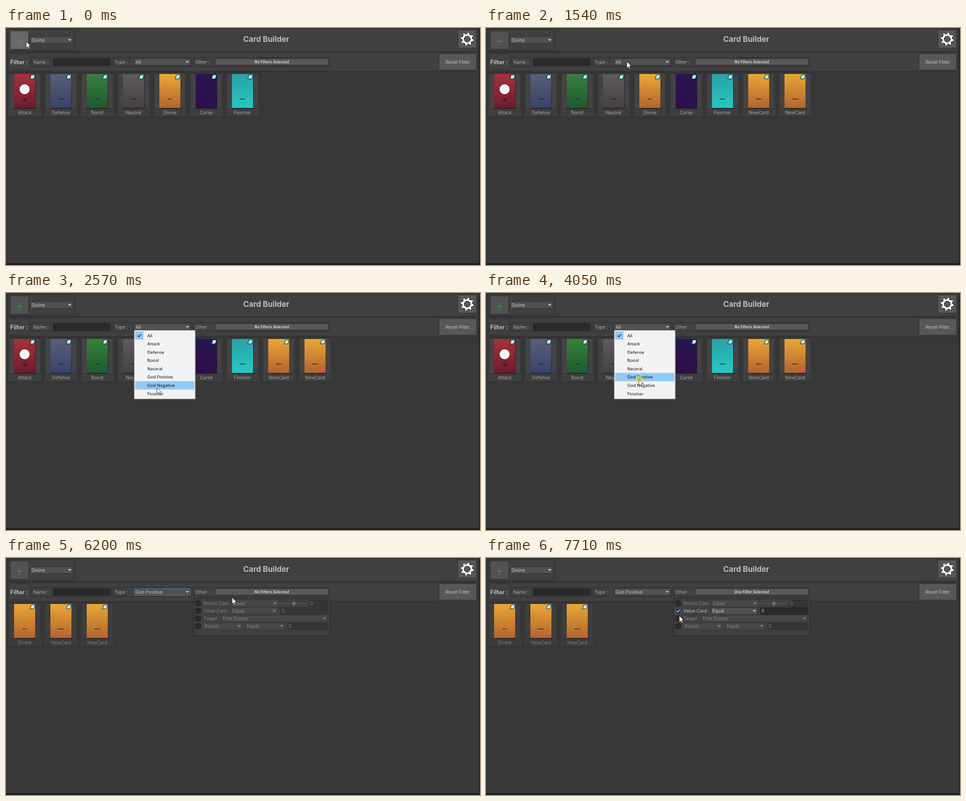
These frames come from a looping animation (1057x530 px, 8 s). An HTML page:

```html
<!DOCTYPE html>
<html lang="en">
<head>
<meta charset="utf-8">
<title>Card Builder</title>
<style>
  html, body { margin: 0; width: 100%; height: 100%; overflow: hidden; background: #383838; }
  svg { display: block; width: 1057px; height: 530px; }
  text { font: 10.2px Inter, sans-serif; fill: #c4c4c4; white-space: pre; }
  text.label { fill: #a9a9a9; }
  text.title { font-size: 17px; font-weight: 700; fill: #bdbdbd; }
  text.head { font-size: 12.75px; font-weight: 700; fill: #bdbdbd; }
  text.pick { font-size: 8.4px; font-weight: 700; font-style: italic; fill: #d2d2d2; }
  text.item { font: 9.8px "Open Sans", "Noto Sans", sans-serif; fill: #000; }
  text.tiny { font-size: 2.8px; font-weight: 800; fill: #16100f; }
  .mid { text-anchor: middle; }
  .tick { fill: none; stroke-width: 1.5px; }
</style>
</head>
<body>
<svg id="stage" viewBox="0 0 1057 530"></svg>
<script>
const LOOP = 8000;
const FRAME = LOOP / 120;
const ADDED = [200, 730];   // new cards appear
const MENU = 1740;          // type menu opens
const FILTERED = 4120;      // type chosen
const PANEL = 5860;         // extra filters open
const CHECKED = 7030;       // value filter ticked

const BAR = '#404040', BUTTON = '#585858', EDGE = '#2a2a2a', FOCUS = '#3c80c8', HOVER = '#91c9f7';
const stage = document.getElementById('stage');

function add(parent, tag, attrs = {}, content) {
  const el = document.createElementNS('http://www.w3.org/2000/svg', tag);
  for (const key in attrs) el.setAttribute(key, attrs[key]);
  if (content !== undefined) el.textContent = content;
  return parent.appendChild(el);
}
const group = (parent = stage) => add(parent, 'g');
const text = (g, x, y, str, cls = '') => add(g, 'text', { x, y, class: cls }, str);
const path = (g, d, attrs) => add(g, 'path', { d, ...attrs });
const rect = (g, x, y, width, height, fill) => add(g, 'rect', { x, y, width, height, fill });

// Bordered rectangle given by its outer edges
function box(g, x1, y1, x2, y2, fill = BAR, stroke = EDGE, rx = 2) {
  return add(g, 'rect', {
    x: x1 + .5, y: y1 + .5, width: x2 - x1 - 1, height: y2 - y1 - 1, fill, stroke, rx
  });
}

// Holds each value until the next step
function play(el, prop, steps) {
  const frames = steps.map(([t, v]) => ({
    offset: Math.max(0, t - 1) / LOOP, easing: 'step-end', [prop]: v
  }));
  frames.push({ offset: 1, [prop]: steps[steps.length - 1][1] });
  el.animate(frames, { duration: LOOP, iterations: Infinity });
}

function show(el, from, to = LOOP) {
  const steps = [[0, from > 0 ? 0 : 1]];
  if (from > 0) steps.push([from, 1]);
  if (to < LOOP) steps.push([to, 0]);
  play(el, 'opacity', steps);
  return el;
}

function dropdown(g, x1, x2, cy, str = '') {
  box(g, x1, cy - 8, x2, cy + 8, '#515151', '#303030', 2.5);
  path(g, `M${x2 - 11.5} ${cy - 2}h8l-4 4z`, { fill: '#c4c4c4' });
  text(g, x1 + 3.5, cy + 3.6, str);
}

function input(g, x1, x2, cy, str = '') {
  box(g, x1, cy - 8, x2, cy + 8, '#2a2a2a', '#1d1d1d', 2.5);
  text(g, x1 + 3, cy + 3.8, str);
}

function field(x1, x2, label) {
  box(stage, x1, 65.5, x2, 86.5);
  text(stage, x1 + 3.8, 79.6, label, 'label');
}

function gear(cx, cy, teeth = 8, outer = 15.4, inner = 11.4, hole = 6.8) {
  const pts = [];
  for (let i = 0; i < teeth * 4; i++) {
    const a = (i + .5) / teeth * Math.PI / 2;
    const r = i % 4 < 2 ? outer : inner;
    pts.push(`${(cx + r * Math.cos(a)).toFixed(2)} ${(cy + r * Math.sin(a)).toFixed(2)}`);
  }
  const arc = `a${hole} ${hole} 0 1 0 `;
  path(stage, `M${pts.join('L')}ZM${cx - hole} ${cy}${arc}${2 * hole} 0${arc}${-2 * hole} 0z`, {
    fill: '#fff', stroke: '#111', 'fill-rule': 'evenodd', 'stroke-linejoin': 'round'
  });
}

// ---- Cards
const KINDS = {
  Attack: ['#a63238', '#6c1c2e'],
  Defense: ['#596078', '#364269'],
  Boost: ['#37803a', '#1d5a30'],
  Neutral: ['#5e5a5e', '#444044'],
  Divine: ['#eba735', '#b46430'],
  Curse: ['#291750', '#300e4c'],
  Finisher: ['#2aa2a7', '#29c7c3']
};
const defs = add(stage, 'defs');
for (const kind in KINDS) {
  const grad = add(defs, 'linearGradient', { id: kind, x1: 0, y1: 0, x2: 0, y2: 1 });
  KINDS[kind].forEach((c, i) => add(grad, 'stop', { offset: i, 'stop-color': c }));
}

function card(parent, slot, kind, name = kind) {
  const g = add(parent, 'g', { transform: `translate(${80.95 * slot} 0)` });
  const frame = group(g);
  box(frame, 3, 99, 81, 199.5, '#3e3e3e');
  box(frame, 6, 101, 77.5, 181, '#434343');
  text(frame, 41.7, 193.3, name, 'label mid');
  rect(g, 18, 103, 47.9, 76.7, '#141414');
  rect(g, 18, 102.8, 47.3, 76, `url(#${kind})`);
  path(g, 'M56.3 104.8H65L62.2 113.8H53.5Z', { fill: '#a9f1f8', stroke: '#0c0c0c' });
  text(g, 42, 160, name, 'tiny mid');
  if (kind === 'Attack') {
    add(g, 'circle', { cx: 41.5, cy: 137, r: 11, fill: '#f5f5f5' });
    text(g, 42, 163, 'Hit 3', 'tiny mid');
  }
  play(frame, 'opacity', [[0, 1], [PANEL, .65]]);
  return g;
}

// ---- Toolbar
rect(stage, 0, 0, 1057, 530, '#383838');
box(stage, 3, 1, 1053, 53);
box(stage, 3, 54, 1053, 97.5);
rect(stage, 0, 526, 1057, 4, '#1c1c1c');
rect(stage, 1055, 0, 2, 530, '#222');

box(stage, 5, 3, 153.5, 50.5);
play(box(stage, 9, 6, 51, 48), 'fill', [[0, '#686868'], [1000, '#525252']]);
const plus = path(stage, 'M23.5 30h13M30 23.5v13', { stroke: '#11c911' });
play(plus, 'stroke-width', [[0, '3px'], [1000, '2px']]);
dropdown(stage, 53.5, 149.5, 27, 'Divine');
text(stage, 580.3, 30.8, 'Card Builder', 'title mid');
box(stage, 1007.5, 4, 1049.5, 45.5, BUTTON);
gear(1028.5, 24.8);

box(stage, 5.5, 57, 54.5, 94.5);
text(stage, 9.5, 80.6, 'Filter :', 'head');
field(57, 235, 'Name :');
input(stage, 105, 232.5, 76);
field(238, 415, 'Type :');
dropdown(stage, 285.5, 412, 76);
show(text(stage, 289, 79.6, 'All'), 0, FILTERED);
show(text(stage, 288.5, 79.6, 'God Positive'), FILTERED);
show(box(stage, 285.5, 68, 412, 84, 'none', FOCUS, 2.5), FILTERED, CHECKED);
field(418, 722, 'Other :');
box(stage, 466, 68, 719.5, 83.5, BUTTON);
show(text(stage, 592.5, 78.8, 'No Filters Selected', 'pick mid'), 0, CHECKED);
show(text(stage, 592.5, 78.8, 'One Filter Selected', 'pick mid'), CHECKED);
box(stage, 965, 57, 1049.5, 94.5, BUTTON);
text(stage, 1007.2, 79.6, 'Reset Filter', 'mid');

// ---- Card lists
const all = group();
Object.keys(KINDS).forEach((kind, i) => card(all, i, kind));
show(all, 0, FILTERED);
ADDED.forEach((t, i) => show(card(stage, 7 + i, 'Divine', 'NewCard'), t, FILTERED));

const filtered = group();
['Divine', 'NewCard', 'NewCard'].forEach((name, i) => card(filtered, i, 'Divine', name));
show(filtered, FILTERED);

// ---- Extra filters panel
const panel = group();
box(panel, 418, 90, 722.5, 174.5, BAR, '#242424');
const rows = [
  (g, cy) => {
    text(g, 440, cy + 3.6, 'Morvu Cost :');
    dropdown(g, 503, 607.5, cy, 'Equal');
    path(g, `M612 ${cy + .5}h60`, { stroke: '#6a6a6a', 'stroke-width': 1.5 });
    add(g, 'circle', { cx: 642, cy: cy + .7, r: 4.3, fill: '#999' });
    input(g, 675.5, 718.5, cy, '0');
  },
  (g, cy) => {
    text(g, 440, cy + 3.6, 'Value Card :');
    dropdown(g, 501, 606, cy, 'Equal');
    input(g, 611.5, 718.5, cy, '0');
  },
  (g, cy) => {
    text(g, 440, cy + 3.6, 'Target :');
    dropdown(g, 479.5, 717.5, cy, 'First Enemy');
  },
  (g, cy) => {
    dropdown(g, 439, 527.5, cy, 'Poison');
    dropdown(g, 533.5, 622.5, cy, 'Equal');
    input(g, 627.5, 718.5, cy, '0');
  }
].map((fill, i) => {
  const cy = 101.4 + 17 * i;
  box(panel, 422, cy - 6, 434.5, cy + 6, '#2b2b2b', '#1d1d1d', 1.5);
  const g = group(panel);
  fill(g, cy);
  play(g, 'opacity', [[0, .5]]);
  return g;
});
play(rows[1], 'opacity', [[0, .5], [CHECKED, 1]]);
const tick = group(panel);
box(tick, 422, 112.4, 434.5, 124.4, 'none', FOCUS, 1.5);
path(tick, 'M425 118.3l2.4 2.6 4.6-5.2', { class: 'tick', stroke: '#e4e4e4' });
show(tick, CHECKED);
show(panel, PANEL);

// ---- Type menu
const ROW = 18.57, TOP = 85.8;
const menu = group();
box(menu, 285.5, 83, 422.5, 237.5, '#f2f2f2', '#979797', 0);
rect(menu, 288, TOP, 18.5, ROW, HOVER);
const bar = rect(menu, 288, TOP, 132, ROW, HOVER);
path(menu, 'M293.5 95l2.8 2.8 5.2-5.6', { class: 'tick', stroke: '#10283c' });
['All', 'Attack', 'Defense', 'Boost', 'Neutral', 'God Positive', 'God Negative', 'Finisher']
  .forEach((name, i) => text(menu, 315, 98.6 + ROW * i, name, 'item'));
show(menu, MENU, FILTERED);

// ---- Pointer
const smooth = u => u * u * (3 - 2 * u);
const out = u => 1 - (1 - u) ** 3;
const even = u => u;

// Start and end time, end point, easing
const MOVES = [
  [930, 1260, 273, 82, smooth],
  [1340, 1530, 314, 75, out],
  [MENU, 2130, 337, 200, smooth],
  [2160, 2530, 336.5, 211.5, out],
  [3290, 3400, 341, 200, even],
  [3510, 3660, 341, 192, out],
  [5060, 5130, 351, 181, even],
  [5130, 5530, 615, 73, smooth],
  [5990, 6190, 508, 87, even],
  [6190, 6800, 428, 115, out],
  [7230, 7660, 431, 129, smooth]
];
function pointerAt(t) {
  let x = 45, y = 30;
  for (const [from, to, endX, endY, ease] of MOVES) {
    const k = ease(Math.min(1, Math.max(0, (t - from) / (to - from))));
    x += (endX - x) * k;
    y += (endY - y) * k;
  }
  return [x, y];
}
const track = Array.from({ length: LOOP / FRAME }, (_, i) => [i * FRAME, pointerAt(i * FRAME)]);

const pointer = group();
const halo = add(pointer, 'circle', { cx: .5, cy: 1, r: 8.3, fill: '#e8e020', 'fill-opacity': .6 });
path(pointer, 'M0 0V14.4L3.3 11.4 5.6 16.5 7.9 15.5 5.6 10.5H10Z', {
  fill: '#fff', stroke: '#111', 'stroke-width': .8
});
// Each click lights up just before its result
const clicks = [...ADDED, MENU, FILTERED, PANEL, CHECKED].flatMap(t =>
  [[t - (ADDED.includes(t) ? 130 : 70), 1], [t, 0]]);
play(halo, 'opacity', [[0, 0], ...clicks]);

play(pointer, 'transform', track.map(([t, [x, y]]) => [t, `translate(${x}px, ${y}px)`]));
play(bar, 'transform', track.map(([t, [, y]]) => {
  const row = Math.max(0, Math.floor((y - TOP) / ROW));
  return [t, `translate(0px, ${row * ROW}px)`];
}));
</script>
</body>
</html>
```
